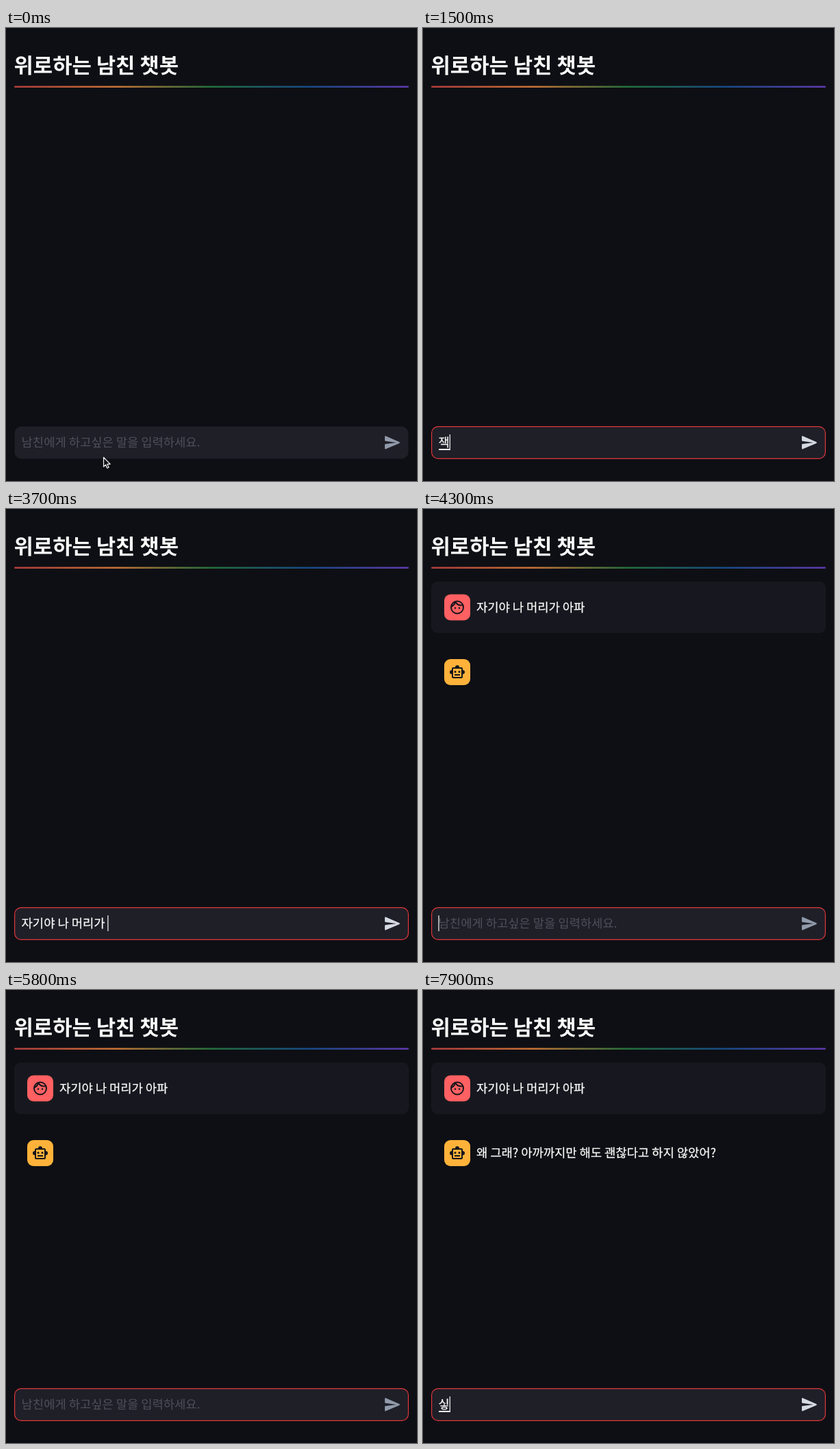
These frames come from a looping animation (600 by 661 pixels, 8000 ms). An HTML page:

```html
<!DOCTYPE html>
<html lang="ko">
<head>
<meta charset="utf-8">
<style>
  html, body { margin: 0; height: 100%; overflow: hidden; background: #0e0f14; }
  svg { display: block; }
  text {
    font: 17.7px "Noto Sans CJK KR", "Noto Sans CJK", "Noto Sans CJK JP", sans-serif;
    fill: #fafafa; stroke: #fafafa; stroke-width: .25px;
    white-space: pre; word-spacing: -.055em; text-rendering: geometricPrecision;
  }
  #title { font-size: 30.8px; font-weight: 600; stroke: none; }
  #hint { fill: #4f4f59; stroke: none; }
</style>
</head>
<body>
<svg width="600" height="661" viewBox="0 0 600 661">
  <defs>
    <linearGradient id="rainbow">
      <stop offset="0" stop-color="#b13d3d"/>
      <stop offset=".26" stop-color="#c87336"/>
      <stop offset=".5" stop-color="#23703c"/>
      <stop offset=".74" stop-color="#174b85"/>
      <stop offset="1" stop-color="#5f3ab0"/>
    </linearGradient>
  </defs>
  <text id="title" x="11.5" y="66">위로하는 남친 챗봇</text>
  <rect x="12" y="84.5" width="576" height="2.4" rx="1.2" fill="url(#rainbow)"/>

  <g id="user">
    <rect x="12" y="106" width="576" height="75" rx="9" fill="#17181f"/>
    <rect x="31" y="124.5" width="38" height="38" rx="9" fill="#ff6062"/>
    <g transform="translate(38 131.5)" fill="none" stroke="#14151b" stroke-width="2">
      <circle cx="12" cy="12" r="9"/>
      <path d="M9.7 4.6Q12.6 9 17.5 9Q19 9 20.4 8.6M9.2 4.6Q7.6 9 3.6 10.8"/>
      <g fill="#14151b" stroke="none"><circle cx="9" cy="13" r="1.25"/><circle cx="15" cy="13" r="1.25"/></g>
    </g>
    <text x="78" y="149.7">자기야 나 머리가 아파</text>
  </g>

  <g id="bot">
    <rect x="31" y="219" width="38" height="38" rx="9" fill="#ffb23a"/>
    <g transform="translate(38 226)" fill="#14151b">
      <path fill-rule="evenodd" d="M20 9V7a2 2 0 0 0-2-2h-3a3 3 0 0 0-6 0H6a2 2 0 0 0-2 2v2a3 3 0 0 0 0 6v4a2 2 0 0 0 2 2h12a2 2 0 0 0 2-2v-4a3 3 0 0 0 0-6zM18 19H6V7h12z"/>
      <circle cx="9" cy="11.5" r="1.5"/><circle cx="15" cy="11.5" r="1.5"/>
      <path d="M8 15h8v2H8z"/>
    </g>
    <text id="reply" x="78" y="244.2"></text>
    <rect id="block" y="228" width="10" height="19" fill="#fafafa"/>
  </g>

  <rect id="field" x="12.6" y="581.6" width="574.8" height="46.8" rx="9.5" fill="#1f1f28" stroke-width="1.2"/>
  <text id="hint" x="22.6" y="610.8">남친에게 하고싶은 말을 입력하세요.</text>
  <text id="typed" x="22.6" y="610.8"></text>
  <rect id="underline" y="614" height="2" fill="#fafafa"/>
  <rect id="caret" y="593" width="1.2" height="23" fill="#fafafa"/>
  <path id="send" transform="translate(550.8 591.5) scale(1.12)" d="M3.4 20.4l17.45-7.48a1 1 0 0 0 0-1.84L3.4 3.6a1 1 0 0 0-1.4 .9V9.1a1 1 0 0 0 .87 1L17 12 2.87 13.9a1 1 0 0 0-.87 1v4.6a1 1 0 0 0 1.4 .9z"/>
  <g id="pointer" stroke-linejoin="round">
    <path id="arrow" d="M.5 .5V14.2L3.6 11.3 5.7 16.2 8 15.2 6 10.4H10.2z" fill="#111217" stroke="#f4f4f4" stroke-width="1.2"/>
    <path id="beam" d="M-3-8Q0-8 0-6Q0-8 3-8M0-6V6M-3 8Q0 8 0 6Q0 8 3 8" fill="none" stroke="#f4f4f4" stroke-width="1.2"/>
  </g>
</svg>
<script>
const LOOP = 8000, FOCUS = 400, SENT = 4200, BOT = 4300, LEFT = 22.6;

// [start in ms, text shown from then on]
const typing = [
  [0, ''], [700, 'ㅈ'], [1100, '재'], [1500, '잭'], [1600, '재'], [1800, '자'], [1900, '작'],
  [2000, '자기'], [2200, '자기ㅇ'], [2300, '자기야'], [2500, '자기야 '], [2700, '자기야 ㄴ'],
  [2900, '자기야 나'], [3000, '자기야 나 ㅁ'], [3100, '자기야 나 머'], [3200, '자기야 나 멀'],
  [3300, '자기야 나 머리'], [3500, '자기야 나 머릭'], [3600, '자기야 나 머리가'],
  [3700, '자기야 나 머리가 '], [3800, '자기야 나 머리가 아'], [3900, '자기야 나 머리가 앞'],
  [4000, '자기야 나 머리가 아파'], [SENT, ''], [7700, 'ㅅ'], [7800, '시'], [7900, '싷']
];
const answer = '왜 그래? 아까까지만 해도 괜찮다고 하지 않았어?';
// [start in ms, letters of the answer shown]
const stream = [
  [0, 0], [5900, 2], [6000, 4], [6100, 6], [6200, 8], [6300, 12], [6400, 15],
  [6500, 17], [6700, 20], [6800, 23], [6900, 25], [7000, answer.length]
];

const $ = id => document.getElementById(id);
const at = (steps, t) => steps.findLast(([start]) => start <= t)[1];
const show = (id, on) => $(id).setAttribute('visibility', on ? 'inherit' : 'hidden');
const set = (id, name, value) => $(id).setAttribute(name, value);
const widthOf = (id, text) => {
  $(id).textContent = text;
  return text ? $(id).getComputedTextLength() : 0;
};

function drawInput(t) {
  const text = at(typing, t);
  const head = widthOf('typed', text.slice(0, -1));
  const full = widthOf('typed', text);
  const blink = t < SENT ? t >= FOCUS : Math.floor((t - BOT) / 500) % 2 === 0;
  set('field', 'stroke', t >= FOCUS ? '#df373a' : 'none');
  set('send', 'fill', text ? '#d5d9e1' : '#909aaa');
  show('hint', !text);
  show('underline', text && !text.endsWith(' '));
  set('underline', 'x', LEFT + head + 0.4);
  set('underline', 'width', Math.max(0, full - head));
  show('caret', text || blink);
  set('caret', 'x', LEFT + full - 0.2);
}

function drawChat(t) {
  show('user', t >= SENT);
  show('bot', t >= BOT);
  const count = at(stream, t);
  const end = 78 + widthOf('reply', answer.slice(0, count));
  set('block', 'x', end);
  show('block', count && t < 7200);
}

function drawPointer(t) {
  const p = Math.min(4, Math.floor(t / 100)) / 4;
  set('pointer', 'transform', `translate(${142 + 4 * p} ${626 - 20 * p})`);
  show('pointer', t < 700);
  show('arrow', p < 0.5);
  show('beam', p >= 0.5);
}

function frame() {
  const t = performance.now() % LOOP;
  drawInput(t);
  drawChat(t);
  drawPointer(t);
  requestAnimationFrame(frame);
}
frame();
</script>
</body>
</html>
```
